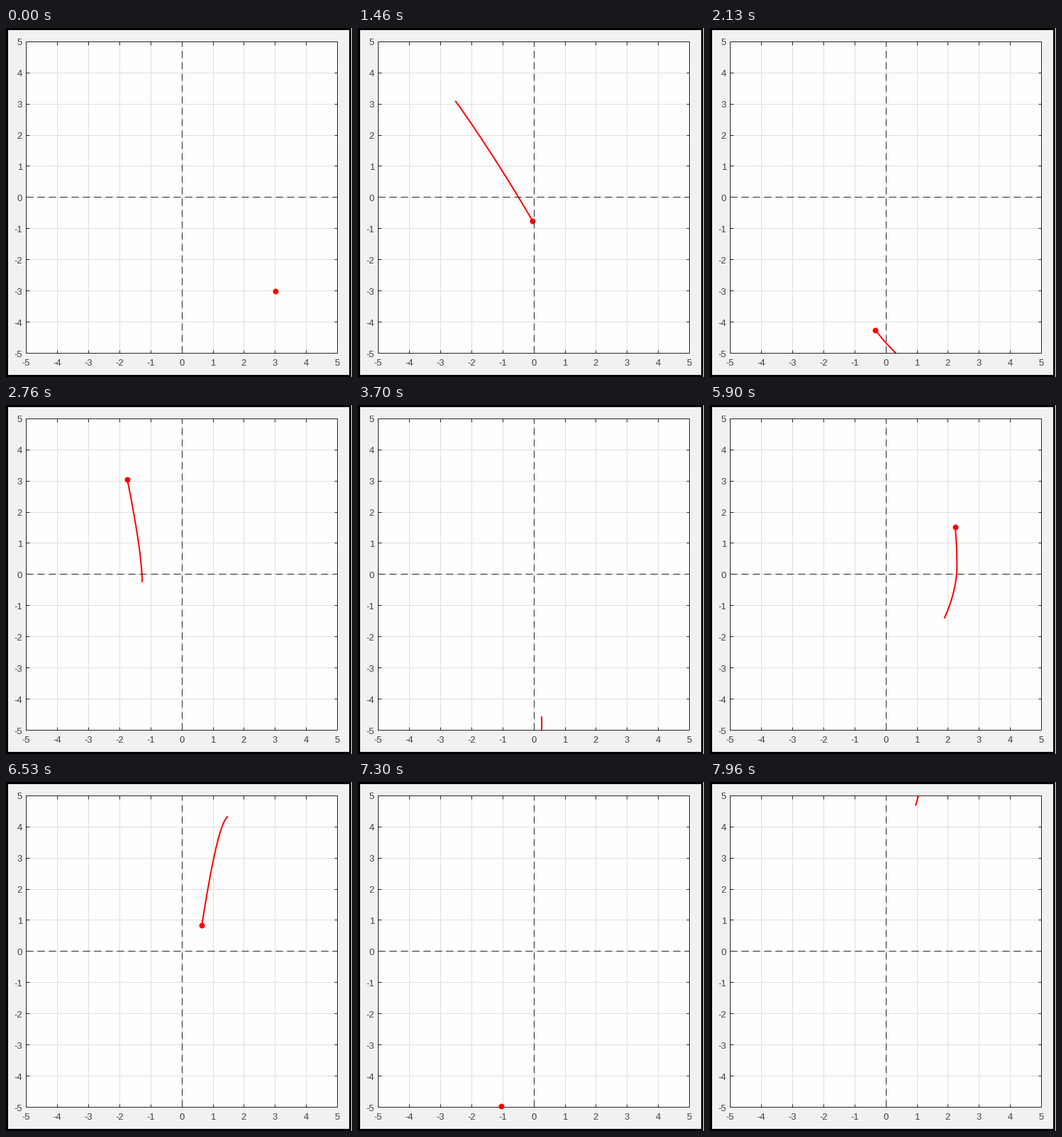
A matplotlib script for the animation above (8000 ms loop, 488 px wide and 492 px high).

```python
import numpy as np
import matplotlib.pyplot as plt
from matplotlib.animation import FuncAnimation
from matplotlib.patches import Rectangle

W, H, DPI = 488, 492, 100
INTERVAL, FRAMES = 20, 400         # one loop of 8 s
FPS = 30                           # the motion itself advances 30 times a second
TRAIL = 8 / FPS                    # seconds of path kept behind the dot
PT = 72 / DPI                      # points per pixel
LEFT, RIGHT, TOP, BOTTOM = 28.7, 467.7, 19.3, 458.3
INK, GRID, RED = "#262626", "#dfdfdf", "#ff0000"


def swing(*keys):
    """Ease through (time, value) keys, coming to rest at every turning point."""
    times, values = np.array(keys).T
    span = np.diff(times)
    rate = np.diff(values) / span
    before, after = rate[:-1], rate[1:]
    same_way = before * after > 0
    slope = np.zeros(len(times))
    slope[1:-1][same_way] = (2 * before * after)[same_way] / (before + after)[same_way]

    def value(t):
        t = np.clip(t, times[0], times[-1])
        i = np.clip(np.searchsorted(times, t, side="right") - 1, 0, len(span) - 1)
        u = (t - times[i]) / span[i]
        ease = u * u * (3 - 2 * u)
        bend = u * (1 - u) * ((1 - u) * slope[i] - u * slope[i + 1])
        return values[i] + ease * (values[i + 1] - values[i]) + span[i] * bend

    return value


x_at = swing((0.3, 3), (1.11, -2.78), (1.75, 1.9), (2.35, -1.28), (2.5, -1.28),
             (2.87, -1.87), (3.45, 0.25), (4.08, -1.88), (4.6, 1.39),
             (5.14, -0.78), (5.78, 2.28), (7.3, -1.05), (7.9, 1.65))
y_at = swing((0.3, -3), (0.38, -3.1), (1.12, 3.4), (1.86, -5.8), (2.5, -0.25),
             (2.87, 3.58), (3.6, -5.8), (4.333, 1.88), (4.55, 3.88), (5.25, -5.7),
             (5.633, -1.42), (5.9, 1.53), (6.25, 4.35), (7.05, -7.9), (7.95, 7.6))


def to_x(x):
    return LEFT + (x + 5) / 10 * (RIGHT - LEFT)


def to_y(y):
    return BOTTOM - (y + 5) / 10 * (BOTTOM - TOP)


fig = plt.figure(figsize=(W / DPI, H / DPI), dpi=DPI, facecolor="#f2f0f0")
ax = fig.add_axes([0, 0, 1, 1])
ax.set_xlim(0, W)
ax.set_ylim(H, 0)
ax.axis("off")


def box(x, y, w, h, **style):
    return ax.add_patch(Rectangle((x, y), w, h, **style))


def label(x, y, value, align):
    ax.text(x, y, str(value), ha=align, va="baseline", color="#404040",
            family="Liberation Sans", fontsize=13 * PT)


# Window border
for edge in ((0, 0, W - 1, 3), (0, H - 3, W - 1, 3), (0, 0, 3, H), (W - 4, 0, 3, H)):
    box(*edge, fc="black", lw=0)

# Grid, ticks and frame sit on whole pixels
ticks = np.arange(-5, 6)
cols, rows = np.floor(to_x(ticks)), np.floor(to_y(ticks))
left, right, bottom, top = cols[0], cols[-1], rows[0], rows[-1]
area = dict(x=left, y=top, w=right - left, h=bottom - top)
plot_area = box(**area, fc="#fefefe", lw=0)
ax.vlines(cols, top, bottom, color=GRID, lw=PT, zorder=2)
ax.hlines(rows, left, right, color=GRID, lw=PT, zorder=2)
for start, end in ((top, top + 5), (bottom - 4, bottom)):
    ax.vlines(cols, start, end, color=INK, lw=PT, zorder=3)
for start, end in ((left, left + 5), (right - 4, right)):
    ax.hlines(rows, start, end, color=INK, lw=PT, zorder=3)
box(**area, fc="none", ec=INK, lw=PT, zorder=3)

for n, col, row in zip(ticks, cols, rows):
    label(col, 475.5, n, "center")
    label(23, row + 5.5, n, "right")

dashes = dict(color=INK, lw=PT, linestyle=(0, (10, 6)), dash_capstyle="butt", zorder=6)
ax.plot([left, right], [rows[5]] * 2, **dashes)
ax.plot([cols[5]] * 2, [bottom, top], **dashes)

trail, = ax.plot([], [], color=RED, lw=2 * PT, zorder=4, solid_capstyle="butt")
trail.set_clip_path(plot_area)
dot, = ax.plot([], [], "o", color=RED, ms=8 * PT, mew=0, zorder=5)


def update(frame):
    now = round(frame * INTERVAL * FPS / 1000) / FPS
    t = np.linspace(now - TRAIL, now, 49)
    x, y = x_at(t), y_at(t)
    trail.set_data(to_x(x), to_y(y))
    dot.set_data(to_x(x[-1:]), to_y(y[-1:]))
    dot.set_visible(bool(abs(y[-1]) <= 5))
    return trail, dot


anim = FuncAnimation(fig, update, frames=FRAMES, interval=INTERVAL,
                     repeat=True, repeat_delay=0, blit=False)
plt.show()
```
